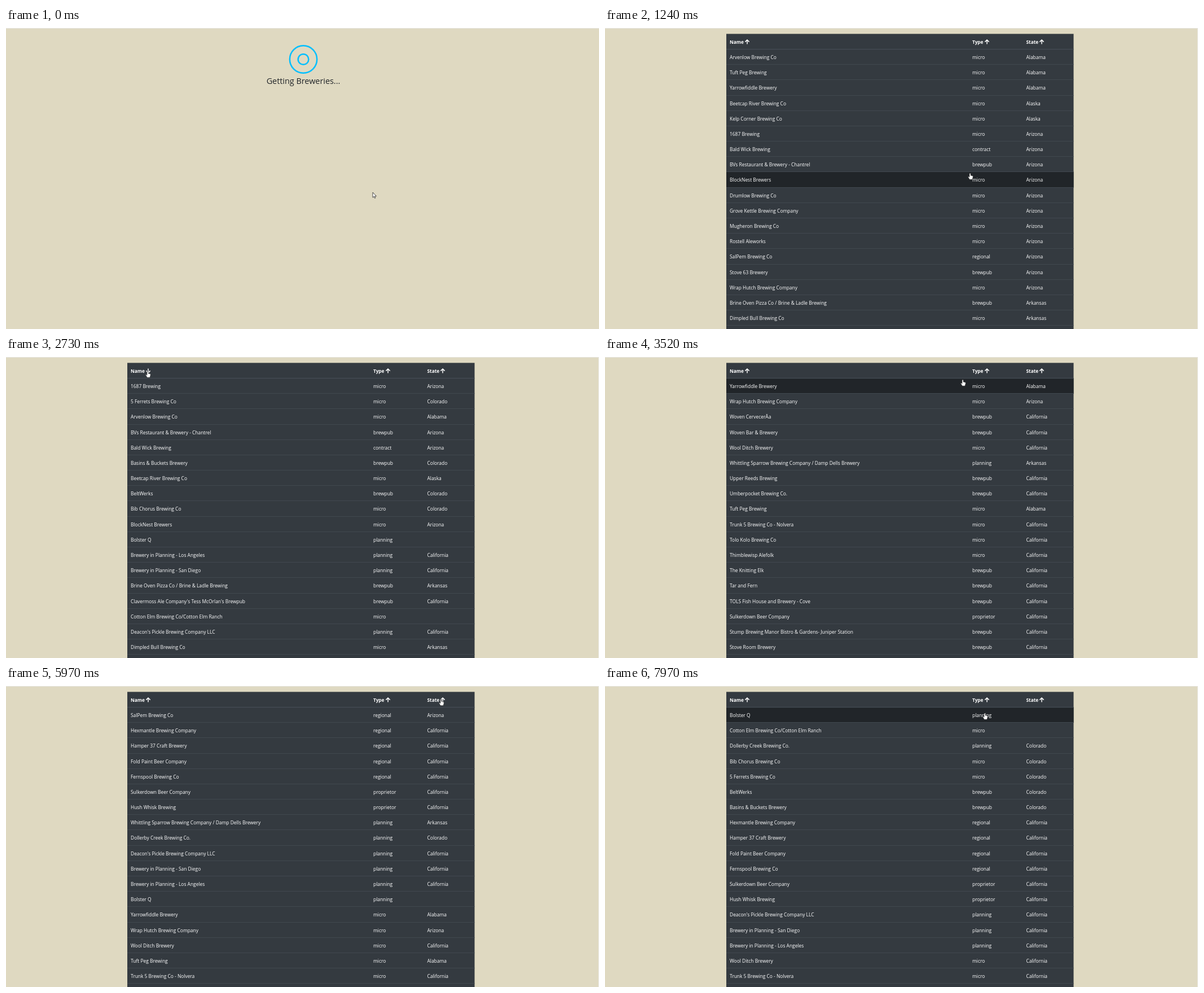
An HTML page with a canvas that plays this animation: 1051x533 px, repeating every 8000 ms.

```html
<!DOCTYPE html>
<html lang="en">
<head>
<meta charset="utf-8">
<title>Brewery table</title>
<style>
html, body { margin: 0; width: 100%; height: 100%; overflow: hidden; background: #dfd9c1; }
canvas { display: block; }
</style>
</head>
<body>
<canvas id="stage" width="1051" height="533"></canvas>
<script>
const ctx = document.getElementById('stage').getContext('2d');
const LOOP = 8000, TABLE_AT = 310, HOVER_AT = 390;
const LEFT = 215, WIDTH = 615.5, ROW_TOP = 38, ROW_H = 27.18, VISIBLE = 18;
const FONT = '"Open Sans", "Noto Sans", sans-serif';
const COLUMNS = [
  { key: 'name', title: 'Name', x: 221, icon: 252 },
  { key: 'type', title: 'Type', x: 651, icon: 677 },
  { key: 'state', title: 'State', x: 746.5, icon: 774 }
];

const rows = `Arvenlow Brewing Co|micro|Alabama
Tuft Peg Brewing|micro|Alabama
Yarrowfiddle Brewery|micro|Alabama
Beetcap River Brewing Co|micro|Alaska
Kelp Corner Brewing Co|micro|Alaska
1687 Brewing|micro|Arizona
Bald Wick Brewing|contract|Arizona
BVs Restaurant & Brewery - Chantrel|brewpub|Arizona
BlockNest Brewers|micro|Arizona
Drumlow Brewing Co|micro|Arizona
Grove Kettle Brewing Company|micro|Arizona
Mugheron Brewing Co|micro|Arizona
Rostell Aleworks|micro|Arizona
SalPem Brewing Co|regional|Arizona
Stove 63 Brewery|brewpub|Arizona
Wrap Hutch Brewing Company|micro|Arizona
Brine Oven Pizza Co / Brine & Ladle Brewing|brewpub|Arkansas
Dimpled Bull Brewing Co|micro|Arkansas
Whittling Sparrow Brewing Company / Damp Dells Brewery|planning|Arkansas
Lopsided Gulley Brewing|brewpub|Arizona
Woven CervecerÃa|brewpub|California
Woven Bar & Brewery|brewpub|California
Wool Ditch Brewery|micro|California
Upper Reeds Brewing|brewpub|California
Umberpocket Brewing Co.|brewpub|California
Trunk 5 Brewing Co - Nolvera|micro|California
Tolo Kolo Brewing Co|micro|California
Thimblewisp Alefolk|micro|California
The Knitting Elk|brewpub|California
Tar and Fern|brewpub|California
TOLS Fish House and Brewery - Cove|brewpub|California
Sulkerdown Beer Company|proprietor|California
Stump Brewing Manor Bistro & Gardens- Juniper Station|brewpub|California
Stove Room Brewery|brewpub|California
Sennola Brewing Co - Tallow District|brewpub|California
Melva Brewing Co|brewpub|California
Lilywhirl Brewing Company|brewpub|California
Lavrin Ale Works @ The Plowman Saloon|brewpub|California
Ladle Bench Brewery and Grille|brewpub|California
Kasp Trovell Brewing Co - Marvelous CityLoop|brewpub|California
Clavermoss Ale Company's Tess McOrlan's Brewpub|brewpub|California
Hexmantle Brewing Company|regional|California
Hamper 37 Craft Brewery|regional|California
Fold Paint Beer Company|regional|California
Fernspool Brewing Co|regional|California
Hush Whisk Brewing|proprietor|California
Deacon's Pickle Brewing Company LLC|planning|California
Brewery in Planning - San Diego|planning|California
Brewery in Planning - Los Angeles|planning|California
Dollerby Creek Brewing Co.|planning|Colorado
Bib Chorus Brewing Co|micro|Colorado
5 Ferrets Brewing Co|micro|Colorado
BeltWerks|brewpub|Colorado
Basins & Buckets Brewery|brewpub|Colorado
Bolster Q|planning|
Cotton Elm Brewing Co/Cotton Elm Ranch|micro|`.split('\n').map(line => {
  const [name, type, state] = line.split('|');
  return { name, type, state };
});

// Each click: highlight on, sort applied, highlight off.
const clicks = [
  { on: 1970, sort: 2050, off: 2200, key: 'name', dir: 1 },
  { on: 2900, sort: 2980, off: 3050, key: 'name', dir: -1 },
  { on: 3990, sort: 4070, off: 4150, key: 'type', dir: 1 },
  { on: 4860, sort: 4930, off: 4930, key: 'type', dir: -1 },
  { on: 6200, sort: 6280, off: 6430, key: 'state', dir: 1 },
  { on: 7090, sort: 7170, off: 7250, key: 'state', dir: -1 }
];

// Pointer positions: time, x, y.
const pointer = [
  [0, 650, 291], [1090, 650, 285], [1170, 649, 272], [1240, 647, 257],
  [1340, 610, 205], [1420, 535, 135], [1500, 440, 78], [1570, 365, 47],
  [1640, 314, 36], [1720, 272, 29], [1800, 256, 26], [1890, 251, 23],
  [2660, 251, 24], [2730, 251, 25], [3200, 251, 26],
  [3370, 330, 32], [3450, 500, 39], [3520, 634, 40], [3620, 664, 35],
  [3700, 672, 29], [3780, 676, 25],
  [5420, 705, 27], [5500, 758, 27], [5580, 790, 27],
  [5730, 784, 23], [5810, 774, 20], [5890, 766, 22], [5970, 771, 23.5],
  [6200, 774, 23], [7250, 777, 27], [7660, 777, 28],
  [7800, 757, 34], [7880, 704, 44], [7970, 673, 48]
];

const sortRows = (list, { key, dir }) => {
  const value = row => row[key] || '~';
  return [...list].sort((a, b) =>
    dir * ((value(a) > value(b)) - (value(a) < value(b))));
};

// Table orders, one for each click passed.
const orders = [rows];
for (const click of clicks) orders.push(sortRows(orders[orders.length - 1], click));

function bezier(p, x1, y1, x2, y2) {
  const at = (s, a, b) => 3 * (1 - s) ** 2 * s * a + 3 * (1 - s) * s * s * b + s ** 3;
  let lo = 0, hi = 1;
  for (let i = 0; i < 24; i++) {
    const mid = (lo + hi) / 2;
    if (at(mid, x1, x2) < p) lo = mid; else hi = mid;
  }
  return at(lo, y1, y2);
}

function text(str, x, y, size, weight = 400) {
  ctx.font = `${weight} ${size}px ${FONT}`;
  ctx.fillText(str, x, y);
}

function drawLoader(t) {
  const step = t < 70 ? 0 : 70 + Math.floor((t - 70) / 80) * 80;
  ctx.strokeStyle = '#00bfff';
  ctx.lineWidth = 2.5;
  for (const offset of [148, 1048]) {
    const phase = ((step + offset) % 1800) / 1800;
    const radius = 1.27 * (1 + 19 * bezier(phase, .165, .84, .44, 1));
    ctx.beginPath();
    ctx.arc(527, 55.5, radius, 0, 7);
    ctx.stroke();
  }
  ctx.fillStyle = '#212529';
  ctx.textAlign = 'center';
  text('Getting Breweries...', 527, 99, 14.4);
  ctx.textAlign = 'left';
}

function drawSortIcon(x, down) {
  ctx.save();
  ctx.translate(x, 24.5);
  if (down) ctx.scale(1, -1);
  ctx.strokeStyle = '#fff';
  ctx.lineWidth = 1.5;
  ctx.beginPath();
  ctx.moveTo(0, 4);
  ctx.lineTo(0, -3.2);
  ctx.moveTo(-3.6, .1);
  ctx.lineTo(0, -3.5);
  ctx.lineTo(3.6, .1);
  ctx.stroke();
  ctx.restore();
}

function drawTable(t, hoverRow) {
  const done = clicks.filter(c => t >= c.sort);
  const last = done[done.length - 1];
  ctx.fillStyle = '#343a40';
  ctx.fillRect(LEFT, 10.4, WIDTH, 523);
  if (hoverRow >= 0) {
    ctx.fillStyle = '#212529';
    ctx.fillRect(LEFT, Math.round(ROW_TOP + hoverRow * ROW_H), WIDTH, 27);
  }
  ctx.fillStyle = '#454d55';
  ctx.fillRect(LEFT, 37, WIDTH, 1.2);
  ctx.fillStyle = '#41484f';
  for (let i = 1; i <= VISIBLE; i++)
    ctx.fillRect(LEFT, Math.round(ROW_TOP + i * ROW_H) - 1, WIDTH, 1);

  ctx.fillStyle = '#fff';
  for (const col of COLUMNS) {
    text(col.title, col.x, 28, 8.3, 700);
    drawSortIcon(col.icon, last && last.key === col.key && last.dir > 0);
  }
  orders[done.length].slice(0, VISIBLE).forEach((row, i) => {
    const y = Math.round(55 + i * ROW_H);
    for (const col of COLUMNS) text(row[col.key], col.x, y, 8.42);
  });
  ctx.fillStyle = '#eeeeec';
  ctx.fillRect(1050, 1, 1, 532);
}

const arrowShape = new Path2D('M0 0V9.2L2.1 7.3L3.5 10.4L4.9 9.8L3.5 6.8H6.4Z');
const handShape = new Path2D('M-1.1 .8Q0-.6 1.1 .8V4L4.2 4.8Q5.4 5.2 5.3 6.4' +
  'L4.6 9.2L4 11.2H-.8L-3.3 7.2Q-3.6 5.8-2.4 6L-1.1 7.2Z');

function drawPointer(x, y, hand) {
  const shape = hand ? handShape : arrowShape;
  ctx.save();
  ctx.translate(x, y);
  ctx.lineWidth = hand ? .6 : .8;
  ctx.strokeStyle = '#222';
  ctx.fillStyle = '#fff';
  ctx.fill(shape);
  ctx.stroke(shape);
  ctx.restore();
}

function draw(t) {
  const [, x, y] = pointer.filter(p => t >= p[0]).pop();
  const live = t >= HOVER_AT;
  const hoverRow = live && y >= ROW_TOP ? Math.floor((y - ROW_TOP) / ROW_H) : -1;
  const onIcon = y < ROW_TOP && COLUMNS.some(c => Math.abs(x - c.icon) < 7);

  ctx.fillStyle = '#dfd9c1';
  ctx.fillRect(0, 0, 1051, 533);
  ctx.fillStyle = '#e9e8e4';
  ctx.fillRect(0, 0, 1051, 1);
  if (t < TABLE_AT) drawLoader(t); else drawTable(t, hoverRow);

  if (clicks.some(c => t >= c.on && t < c.off)) {
    ctx.fillStyle = 'rgba(190, 178, 0, .75)';
    ctx.beginPath();
    ctx.arc(x, y, 6.7, 0, 7);
    ctx.fill();
  }
  drawPointer(x, y, live && (hoverRow >= 0 || onIcon));
}

const start = performance.now();
function tick() {
  draw((performance.now() - start) % LOOP);
  requestAnimationFrame(tick);
}
tick();
</script>
</body>
</html>
```
